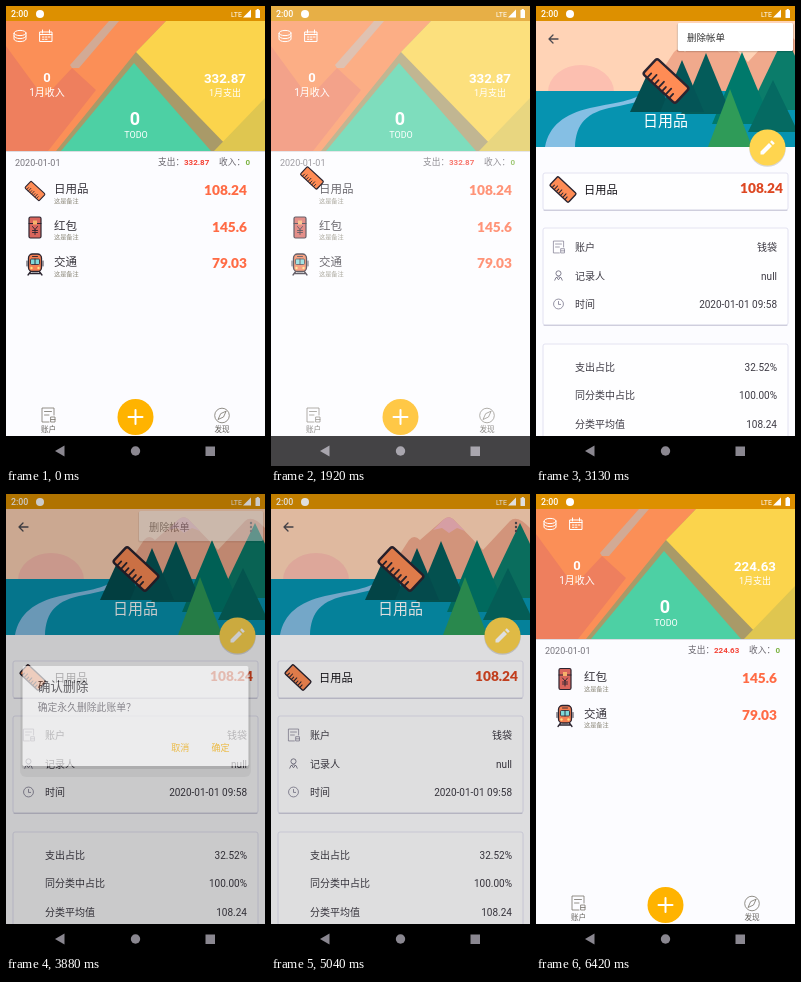
Animation, 259 px wide and 460 px high, one loop 6460 ms. Source, as an HTML page:

```html
<!DOCTYPE html>
<html lang="zh-CN">
<head>
<meta charset="utf-8">
<style>
html, body { margin: 0; width: 100%; height: 100%; overflow: hidden; background: #fcfcff; }
svg { display: block; width: 100vw; height: 100vh; font-family: Roboto, "Noto Sans CJK SC", "Noto Sans CJK", sans-serif; }
.price { font-family: Lato, sans-serif; font-weight: 900; }
</style>
</head>
<body>
<svg id="stage" viewBox="0 0 259 460"></svg>
<script>
const LOOP = 6460;

const text = (x, y, size, fill, str, anchor = 'start', extra = '') =>
  `<text x="${x}" y="${y}" font-size="${size}" fill="${fill}" text-anchor="${anchor}" ${extra}>${str}</text>`;
const rect = (x, y, w, h, fill, extra = '') =>
  `<rect x="${x}" y="${y}" width="${w}" height="${h}" fill="${fill}" ${extra}/>`;
const circle = (x, y, r, fill, extra = '') => `<circle cx="${x}" cy="${y}" r="${r}" fill="${fill}" ${extra}/>`;
const poly = (points, fill) => `<polygon points="${points}" fill="${fill}"/>`;
const line = (d, color, width = 1) =>
  `<path d="${d}" fill="none" stroke="${color}" stroke-width="${width}" stroke-linecap="round" stroke-linejoin="round"/>`;
const group = (id, body) => `<g id="${id}">${body}</g>`;
const at = (x, y, body, scale = 1) => `<g transform="translate(${x} ${y}) scale(${scale})">${body}</g>`;
const bold = 'font-weight="700"';

// Icons, centred on the origin
const INK = '#2b2430';
const ruler = `<g transform="rotate(43)">${
  rect(-22, -10.5, 44, 21, '#ff8c55', `rx="2.5" stroke="${INK}" stroke-width="2.4"`)}${
  line([-16, -11, -6, -1, 4, 9, 14].map((x, i) => `M${x} 10v${i % 2 ? -8 : -5.5}`).join(''), INK, 1.8)}</g>`;
const packet =
  rect(-6, -10.5, 12, 21, '#d9655c', `rx="1.5" stroke="${INK}" stroke-width="1.2"`) +
  line('M-6 -4H6', INK) + rect(-2, -7, 4, 4, '#f6b26b') +
  line('M-2.5 -1L0 2L2.5 -1M0 2V7M-2.5 3H2.5M-2.5 5H2.5', INK, 0.9);
const train =
  line('M-4 7L-7 11M4 7L7 11M-5 9.5H5', INK, 1.3) +
  rect(-6.5, -10, 13, 17.5, '#f47f52', `rx="4" stroke="${INK}" stroke-width="1.3"`) +
  rect(-4.5, -5, 9, 5.5, '#7fd8d8', `rx="1" stroke="${INK}" stroke-width=".8"`) +
  line('M-2.5 -7.5H2.5M0 -5V0.5M-8 -3V2M8 -3V2', INK, 0.9) +
  circle(-3.5, 4, 1.2, '#ffe082') + circle(3.5, 4, 1.2, '#ffe082');
const ledger = c =>
  line('M6 0V-7H-6V7H1M-3.5 -3.5H3.5M-3.5 0H1M3 2H7V7H3ZM3 4.5H7', c, 0.8);
const person = c =>
  circle(0, -2.5, 3, 'none', `stroke="${c}" stroke-width=".9"`) + line('M-4.5 5.5Q-4 1.5 0 1.5T4.5 5.5M-1.5 3L0 5L1.5 3', c, 0.9);
const clock = c => circle(0, 0, 5.8, 'none', `stroke="${c}" stroke-width=".9"`) + line('M0 -3V0.5H2.5', c, 0.9);
const compass = c =>
  circle(0, 0, 7.3, 'none', `stroke="${c}" stroke-width=".8"`) + line('M4 -4L1.5 1.5L-4 4L-1.5 -1.5Z', c, 0.8);
const coins = line('M-6 -3A6 2.6 0 0 1 6 -3A6 2.6 0 0 1 -6 -3V3A6 2.6 0 0 0 6 3V-3M-6 0A6 2.6 0 0 0 6 0', '#fff', 1);
const calendar = line('M-6 -4H6V5.5H-6ZM-6 -1.5H6M-3.5 -6V-3M3.5 -6V-3M-3.5 1H-2M-.5 1H1M2.5 1H4M-3.5 3.3H-2M-.5 3.3H1', '#fff', 1);

const status =
  rect(0, 0, 259, 15, '#dd9000') +
  text(5, 11, 8.8, '#fff', '2:00', 'start', 'font-weight="500"') + circle(34, 8, 4, '#fff') +
  text(225, 10.5, 7, '#fff', 'LTE') +
  poly('237,11.5 245,11.5 245,3.5', '#fff') +
  rect(249.5, 4, 4.5, 8, '#fff', 'rx=".6"') + rect(250.7, 3, 2.1, 1.5, '#fff');

const navBar =
  rect(0, 430, 259, 30, '#000') +
  poly('49,445 58.5,439.5 58.5,450.5', '#8a8790') + circle(129.5, 445, 4.7, '#8a8790') + rect(199.5, 440.5, 9.5, 9.5, '#8a8790') +
  rect(0, 430, 259, 30, '#fcf8ff', 'id="navGlow"');

const billRow = (id, y, icon, scale, name, price) => group(id,
  group(id + 'Icon', at(29, y, icon, scale)) +
  text(48, y + 2, 11.5, '#37343c', name) +
  text(48, y + 11.5, 6.2, '#8b8778', '这是备注') +
  text(241, y + 4, 13.7, '#ff6b45', price, 'end', 'class="price"'));

const wallpaper =
  rect(0, 15, 259, 130, '#a99a68') +
  poly('0,15 160,15 130,46 50,145 0,145', '#fb8f57') +
  poly('0,40 38,92 66,62 90,84 42,145 0,145', '#ee7f5e') +
  poly('103,15 113,15 73,62 66,62 64,59', '#d2aa95') +
  poly('160,15 259,15 259,145 226,145 130,46', '#fbd44c') +
  poly('259,92 259,145 208,145', '#dfc650') +
  poly('128,57 55,145 205,145', '#4dd0a4');

const home =
  rect(0, 0, 259, 430, '#fcfcff') + status + wallpaper + rect(0, 145, 259, 1, '#dcdce2') +
  at(14, 30, coins) + at(40, 30, calendar) +
  text(41, 76, 13, '#fff', '0', 'middle', bold) +
  text(41, 90, 10, '#fff', '1月收入', 'middle') +
  text(219, 76.5, 13.3, '#fff', '332.87', 'middle', bold + ' class="total"') +
  text(219, 90, 9, '#fff', '1月支出', 'middle') +
  text(129, 118.5, 18, '#fff', '0', 'middle', bold) +
  text(130, 132, 9, '#fff', 'TODO', 'middle') +
  text(9, 159.5, 9, '#77747c', '2020-01-01') +
  text(152, 159, 8.7, '#67646c', '支出：') +
  text(178, 159, 8, '#f44336', '332.87', 'start', bold + ' class="total"') +
  text(213, 159, 8.7, '#67646c', '收入：') +
  text(239.5, 159, 8, '#7cb342', '0', 'start', bold) +
  billRow('bill1', 185, ruler, 0.44, '日用品', '108.24') +
  group('rest', billRow('bill2', 221.5, packet, 1, '红包', '145.6') + billRow('bill3', 258, train, 1, '交通', '79.03')) +
  at(42, 409, ledger('#77736a')) + text(42.5, 426, 7.6, '#66635f', '账户', 'middle') +
  at(216, 409.5, compass('#77736a')) + text(216, 426, 7.6, '#66635f', '发现', 'middle') +
  circle(129.5, 411, 18, '#ffb300') + line('M129.5 404V418M122.5 411H136.5', '#fff', 2);

const tree = (x, top, half, base, fill) => poly(`${x},${top} ${x - half},${base} ${x + half},${base}`, fill);
const scenery =
  rect(0, 15, 259, 126, '#ffd3b6') +
  `<path d="M12 86A33 27 0 0 1 78 86Z" fill="#fcbfb0"/>` +
  `<path d="M112 86L138 46Q143 40 149 46L172 26Q178 20 184 27L212 56L239 27Q246 20 259 34V86Z" fill="#f0a98c"/>` +
  `<path d="M162 36L172 26Q178 20 184 27L194 37L186 34L178 39L171 34Z" fill="#f5b4bb"/>` +
  rect(0, 85, 259, 56, '#0693b0') +
  `<path d="M119 86C108 96 92 98 78 101C50 106 40 118 39 141H9C13 120 28 108 54 102C82 96 98 95 108 86Z" fill="#85bfe4"/>` +
  tree(249, 29, 36, 104, '#0b7c6a') +
  tree(206, 46, 30, 118, '#00796b') + tree(170, 47, 25, 108, '#045c5a') +
  tree(115, 60, 21, 106, '#034e50') + tree(146, 54, 22, 106, '#045557') +
  tree(237, 74, 25, 126, '#056a62') + tree(194, 83, 22, 141, '#2f9b58');

const card = (y, h) => rect(7, y, 245, h, '#fefeff', 'rx="2" stroke="#dcdbee" stroke-width=".8"') +
  line(`M8 ${y + h + 0.3}H251`, '#bdbccf', 0.8);
const field = (y, label, value, icon = '') =>
  at(22.5, y - 1, icon, 0.85) + text(39, y + 3, 10, '#3d3a44', label) + text(241, y + 3, 10, '#3d3a44', value, 'end');

const detail =
  rect(0, 0, 259, 430, '#fcfcff') + status + scenery +
  line('M22 33H13M17 29L13 33L17 37', '#4c4a50', 1.3) +
  [29, 33, 37].map(y => circle(245, y, 1.2, '#4c4a50')).join('') +
  text(129.5, 120, 15, '#fff', '日用品', 'middle') +
  card(167, 37) + at(27, 183.5, ruler, 0.58) +
  text(48, 188, 11.2, '#16141a', '日用品', 'start', 'font-weight="500"') +
  text(247, 187, 13.7, '#dd4722', '108.24', 'end', 'class="price"') +
  card(222, 97) +
  field(242, '账户', '钱袋', ledger('#77748a')) +
  field(270.5, '记录人', 'null', person('#5f5c72')) +
  field(299, '时间', '2020-01-01 09:58', clock('#77748a')) +
  card(338, 100) +
  field(361.5, '支出占比', '32.52%') + field(390, '同分类中占比', '100.00%') + field(419, '分类平均值', '108.24') +
  circle(231.5, 142.5, 18.3, '#000', 'opacity=".15"') + circle(231.5, 141.5, 18, '#ffd54f') +
  at(231.5, 141.5, '<path d="M-7 4V7H-4L4.5 -1.5L1.5 -4.5ZM2.5 -5.5L5.5 -2.5L7.3 -4.3L4.3 -7.3Z" fill="#fff"/>');

const popup = rect(132, 17.5, 126, 31, '#000', 'rx="2" opacity=".16"') +
  rect(133, 17, 124, 30, '#fff', 'rx="1.5"') + text(143, 36.5, 10.2, '#333', '删除帐单');

const dialog =
  rect(12, 174, 235, 110, '#000', 'rx="6" opacity=".08"') + rect(13.5, 172, 232, 104, '#000', 'rx="3" opacity=".15"') +
  rect(14.5, 171, 230, 102, '#fff', 'rx="2"') +
  text(30, 197, 12.9, '#29272e', '确认删除') +
  text(30, 217, 10, '#66636c', '确定永久删除此账单？') +
  text(175, 258, 9.2, '#ffb300', '取消', 'middle', 'font-weight="500"') +
  text(216, 258, 9.2, '#ffb300', '确定', 'middle', 'font-weight="500"');

const stage = document.getElementById('stage');
stage.innerHTML = home + rect(0, 0, 259, 430, '#fff', 'id="veil"') + group('detail', detail) +
  group('flyer', ruler) + group('popup', popup) + rect(0, 0, 259, 430, '#000', 'id="scrim"') +
  group('dialog', dialog) + navBar;

const el = id => document.getElementById(id);
const ramp = (t, from, length) => Math.min(1, Math.max(0, (t - from) / length));
const smooth = p => p * p * (3 - 2 * p);
const decel = p => 1 - (1 - p) ** 2;
const fade = (id, value) => {
  el(id).setAttribute('opacity', value);
  el(id).style.display = value > 0 ? '' : 'none';
};
const move = (id, transform) => el(id).setAttribute('transform', transform);
const scaleAbout = (x, y, s) => `translate(${x} ${y}) scale(${s}) translate(${-x} ${-y})`;

function draw(t) {
  // Opening and closing the bill page
  const fly = smooth(ramp(t, 1848, 340)) - smooth(ramp(t, 5440, 320));
  fade('veil', ramp(t, 1820, 370) - ramp(t, 5480, 280));
  fade('detail', smooth(ramp(t, 1980, 260)) - smooth(ramp(t, 5420, 240)));
  fade('navGlow', 0.27 * (ramp(t, 1820, 90) - ramp(t, 1980, 120)));
  const flying = t > 1848 && t < 5760;
  fade('flyer', flying ? 1 : 0);
  fade('bill1Icon', flying ? 0 : 1);
  move('flyer', `translate(${29 + 101 * fly} ${185 - 110 * fly}) scale(${0.44 + 0.56 * fly})`);

  // Menu, then confirmation
  const menu = decel(ramp(t, 3050, 200));
  fade('popup', Math.min(1, menu * 1.6) - ramp(t, 3800, 150));
  move('popup', scaleAbout(257, 18, 0.8 + 0.2 * menu));
  const ask = decel(ramp(t, 3790, 220));
  fade('dialog', ask - ramp(t, 4860, 150));
  move('dialog', scaleAbout(129.5, 222, 0.95 + 0.05 * ask));
  fade('scrim', 0.5 * (ramp(t, 3800, 200) - ramp(t, 4880, 215)));

  // Deleted bill leaves the list
  fade('bill1', 1 - ramp(t, 5760, 100));
  move('rest', `translate(0 ${-36.5 * smooth(ramp(t, 5840, 180))})`);
  const total = t < 5760 ? '332.87' : '224.63';
  for (const node of document.querySelectorAll('.total')) node.textContent = total;
}

function tick() {
  draw(performance.now() % LOOP);
  requestAnimationFrame(tick);
}
tick();
</script>
</body>
</html>
```
